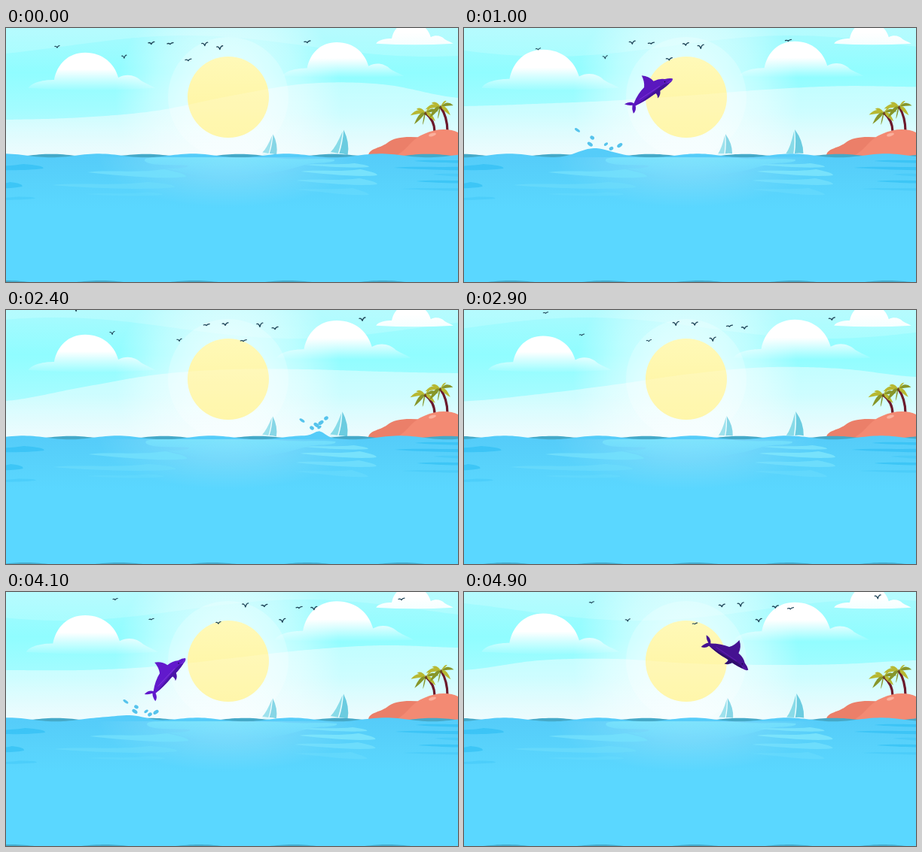
Write an HTML page with a canvas that moves like this. It is 600x338 px and loops after 5000 ms.

```html
<!DOCTYPE html>
<html lang="en">
<head>
<meta charset="utf-8">
<title>Sea with dolphin</title>
<style>
html, body { margin: 0; width: 100%; height: 100%; overflow: hidden; background: #5ad7ff; }
canvas { display: block; width: 100vw; height: 100vh; }
</style>
</head>
<body>
<canvas id="stage" width="600" height="338"></canvas>
<script>
const g = document.getElementById('stage').getContext('2d');
const W = 600, H = 338, LOOP = 5, STEP = 0.1, LEAP = 3.3, TAU = Math.PI * 2;

const wave = (t, period, peak = 0) => Math.cos(TAU * (t - peak) / period);

function fade(x0, y0, x1, y1, ...stops) {
  const f = g.createLinearGradient(x0, y0, x1, y1);
  stops.forEach(([at, color]) => f.addColorStop(at, color));
  return f;
}

function halo(x, y, r0, r1, ...stops) {
  const f = g.createRadialGradient(x, y, r0, x, y, r1);
  stops.forEach(([at, alpha]) => f.addColorStop(at, `rgba(255,255,255,${alpha})`));
  return f;
}

function shape(d, fill) {
  g.fillStyle = fill;
  g.fill(new Path2D(d));
}

function at(x, y, angle, scale, draw) {
  g.save();
  g.translate(x, y);
  g.rotate(angle);
  g.scale(scale, scale);
  draw();
  g.restore();
}

// fills from a height function to a flat edge
function area(top, edge, fill) {
  g.beginPath();
  g.moveTo(0, edge);
  for (let x = 0; x <= W; x += 4) g.lineTo(x, top(x));
  g.lineTo(W, edge);
  g.closePath();
  g.fillStyle = fill;
  g.fill();
}

function oval(x, y, rx, ry, fill) {
  g.beginPath();
  g.ellipse(x, y, rx, ry, 0, 0, TAU);
  g.fillStyle = fill;
  g.fill();
}

/* ---------- sky ---------- */

// time in the leap cycle, then heights every 100 px
const haze = [
  [0, 122, 119, 110, 90, 74, 75, 93],
  [0.5, 107, 108, 102, 91, 78, 71, 82],
  [0.8, 104, 104, 99, 88, 77, 71, 74],
  [1.6, 104, 91, 89, 95, 97, 96, 91],
  [2.4, 121, 103, 86, 79, 79, 82, 84],
  [3.3, 122, 119, 110, 90, 74, 75, 93]
];

function hazeLine(u) {
  const i = haze.findIndex(k => k[0] > u), a = haze[i - 1], b = haze[i];
  const k = (u - a[0]) / (b[0] - a[0]);
  const ys = a.slice(1).map((y, n) => y + (b[n + 1] - y) * k);
  return x => {
    const n = Math.min(5, Math.floor(x / 100)), s = x / 100 - n;
    const p = ys[Math.max(0, n - 1)], q = ys[n], r = ys[n + 1], v = ys[Math.min(6, n + 2)];
    return q + s * ((r - p) / 2 + s * (p - 2.5 * q + 2 * r - v / 2 + s * (1.5 * (q - r) + (v - p) / 2)));
  };
}

function sky(u) {
  g.fillStyle = fade(0, 0, 0, 170, [0, '#a8fafe'], [0.35, '#90fdff'], [0.65, '#a4fcff'], [1, '#cdf6fb']);
  g.fillRect(0, 0, W, 174);
  area(x => 24 + 14 * Math.cos(TAU * ((x - 560) / 640 - u / LEAP)), 0, 'rgba(255,255,255,.16)');

  oval(295, 92, 150, 150, halo(295, 92, 50, 150, [0, 0.6], [0.5, 0.35], [1, 0]));
  oval(295, 92, 80, 80, 'rgba(255,255,255,.22)');

  const line = hazeLine(u);
  area(line, 174, fade(0, 72, 0, 168, [0, 'rgba(255,255,255,.42)'], [0.45, 'rgba(255,255,255,.45)'], [1, 'rgba(255,255,255,.64)']));
  oval(295, 92, 54, 54, fade(0, 38, 0, 146, [0, '#fff9b8'], [1, '#fff49c']));
  g.save();
  g.beginPath();
  g.arc(295, 92, 54, 0, TAU);
  g.clip();
  area(line, 174, 'rgba(255,255,255,.14)');
  g.restore();
}

// grows and shrinks from the middle of its base
function cloud(x, base, scale, foot) {
  at(x, base, 0, scale, () => shape(
    'M-75 -2C-71 -10 -54 -13 -41 -13C-37 -34 -22 -49 0 -49C24 -49 39 -34 44 -16C55 -22 67 -19 74 -12C82 -7 87 -6 93 -2Q10 3 -75 -2Z',
    fade(0, -49, 0, 0, [0, '#fff'], [0.45, '#fff'], [1, foot])));
}

function clouds(t) {
  cloud(105, 82, 1.03 + 0.06 * wave(t, 3.7, 1.2), 'rgba(255,255,255,.05)');
  cloud(439, 66, 1.03 - 0.07 * wave(t, 7.4), 'rgba(255,255,255,0)');
  cloud(537, 22, 0.61, 'rgba(255,255,255,.88)');
}

const birds = [[68, 25], [157, 39], [193, 20], [218, 20], [264, 22], [284, 27], [242, 42], [400, 18], [20, -12]];

function flock(t) {
  g.strokeStyle = '#1d4256';
  g.lineWidth = 1.3;
  g.lineJoin = 'round';
  birds.forEach(([x0, y0], i) => {
    const climb = [2.6, 0.5, -0.4, -0.5, -0.5, -1.2, -0.8, -2.2, 5.2][i];
    const x = x0 + 30.5 * t, y = y0 + climb * t;
    const up = 1.8 + 1.6 * Math.sin(TAU * t / 1.1 + i * 1.7), s = i < 2 || i > 7 ? 0.8 : 1;
    at(x, y, -0.1, s, () => {
      g.beginPath();
      g.moveTo(-4, -up + 0.8);
      g.quadraticCurveTo(-1.5, -up, -0.3, 1.6);
      g.quadraticCurveTo(1.3, -up, 4, -up + 0.2);
      g.stroke();
    });
  });
}

/* ---------- horizon ---------- */

function boat(x, scale, t, lag, alpha) {
  const rock = wave(t, 2.1, lag);
  g.globalAlpha = alpha;
  at(x + 1.6 * rock, 168, 0.08 + 0.09 * rock, scale, () => {
    shape('M-12 -1Q-6 -9 -1 -31Q0 -14 -2 -1Z', '#88dbe8');
    shape('M0 -33Q11 -18 11 -1Q5 -2 -.5 -1Q2 -16 0 -33Z', '#6bcce0');
    shape('M-13 0H12L9 3H-9Z', '#d8f5fa');
  });
  g.globalAlpha = 1;
}

function palm(x, y, lean, tall, t) {
  const cx = x + lean + 0.6 * wave(t, 3.3, 1), cy = y - tall;
  g.strokeStyle = '#6b1a2c';
  g.lineCap = 'round';
  g.lineWidth = 3.2;
  g.beginPath();
  g.moveTo(x, y);
  g.quadraticCurveTo(x, y - tall * 0.6, cx, cy);
  g.stroke();
  at(cx, cy, 0.02 * wave(t, 3.3, 1), 1, () => {
    const leaves = [[-20, 3], [-15, 15], [-12, -5], [-4, 16], [8, -8], [17, -2], [13, 11]];
    leaves.forEach(([dx, dy], i) => {
      const bend = -Math.abs(dx) * 0.25 - 2;
      shape(`M0 0Q${dx * 0.5} ${dy * 0.3 + bend - 3} ${dx} ${dy}Q${dx * 0.45} ${dy * 0.6 + bend + 6} 0 0Z`,
        i % 2 ? '#87962a' : '#b7b832');
    });
    oval(0, 1, 1.8, 1.8, '#6b4a20');
  });
}

function island(t) {
  shape('M481 172C480 160 495 161 506 153C516 144 536 144 554 146L570 172Z', '#eb7f69');
  palm(569, 138, -12, 25, t);
  palm(586, 138, -9, 33, t);
  shape('M512 172C532 166 536 148 555 141C572 133 590 134 600 139V172Z', '#f38a73');
  at(566, 142, -0.3, 1, () => oval(0, 0, 5, 2, '#fbb09d'));
}

/* ---------- dolphin ---------- */

function dolphin(u) {
  if (u < 0.58 || u > 2.15) return;
  const d = u - 1.32, x = 347 + 166 * (u - 1.6), y = 71.5 + 161 * d * d;
  const light = 45 - 13 * Math.min(1, Math.max(0, (u - 0.8) / 0.8));
  g.save();
  g.beginPath();
  g.rect(0, 0, W, 169);
  g.clip();
  at(x, y, Math.atan2(322 * d, 166) + (d > 0 ? 0.1 : -0.03), 1, () => {
    const skin = `hsl(264 78% ${light}%)`, dark = `hsl(262 78% ${light - 8}%)`;
    shape('M-28 -1Q-33 -3 -36 -8Q-28 -8 -25 -2Q-13 -10 -2 -12Q3 -18 4 -27Q12 -21 13 -12Q22 -11 27 -6Q33 -4 36 -1Q35 2 29 2Q18 4 4 3Q-12 4 -25 2Q-27 8 -33 9Q-32 3 -28 -1Z', skin);
    shape('M29 2Q18 4 4 3Q-10 4 -22 2Q0 0 18 -1Q26 -1 29 2Z', dark);
    shape('M14 1Q12 9 5 10Q8 6 6 1Z', dark);
    g.strokeStyle = `hsl(268 70% ${light + 12}%)`;
    g.lineWidth = 0.7;
    g.stroke(new Path2D('M-16 -2Q2 -2 16 -2M27 0L34 0'));
    oval(25, -3, 0.8, 0.8, '#160638');
  });
  g.restore();
}

// offset and height of each drop
const splashes = [
  { x: 180, start: 0.6, now: 0.22, hump: [-10, 28, 6.5], drops: [[-21, 23], [-7, 16], [-9, 10], [6, 10], [19, 9], [11, 6]] },
  { x: 415, start: 1.95, now: 0.5, hump: [1, 10, 7], drops: [[-22, 22], [-9, 12], [-3, 16], [1, 13], [3, 19], [10, 25]] }
];
const SPLASH = 0.9;
const life = (s, u) => (u - s.start) / SPLASH;

function swell(u) {
  return x => splashes.reduce((sum, s) => {
    const k = life(s, u), [dx, width, tall] = s.hump;
    if (k <= 0 || k >= 1) return sum;
    const size = Math.sin(Math.PI * k) / Math.sin(Math.PI * s.now);
    return sum + tall * Math.min(1.2, size) * Math.exp(-(((x - s.x - dx) / width) ** 2));
  }, 0);
}

function drops(u) {
  splashes.forEach(s => {
    const k = life(s, u);
    if (k <= 0 || k >= 1) return;
    const rise = k * (1 - k) / (s.now * (1 - s.now));
    s.drops.forEach(([dx, h], i) => {
      const spread = 0.6 + 0.4 * k / s.now;
      at(s.x + dx * spread, 169 - h * rise, dx < 0 ? 0.6 : -0.6, 1, () =>
        oval(0, 0, i % 2 ? 3 : 4, i % 3 ? 2.3 : 1.7, '#55c3ec'));
    });
  });
}

/* ---------- sea ---------- */

// a streak pointed at both ends
function streak(x0, x1, y, thick, slope, fill) {
  const w = x1 - x0;
  shape(`M${x0} ${y}C${x0 + w * 0.2} ${y - thick} ${x0 + w * 0.5} ${y + thick * 0.4} ${x0 + w * 0.78} ${y - thick}` +
    `Q${x1 + 2} ${y - thick + slope} ${x1} ${y + slope}C${x0 + w * 0.75} ${y + thick + slope} ${x0 + w * 0.3} ${y + thick} ${x0} ${y}Z`, fill);
}

function sea(t, u) {
  const roll = x => Math.cos(TAU * (x - 60 - 62.5 * t) / 125);
  const bump = swell(u);
  area(x => 169.8 - 2.1 * roll(x), H, '#45a9c8');
  dolphin(u);
  area(x => 169.8 + 2.5 * roll(x) - bump(x), H, fade(0, 168, 0, 240, [0, '#55ccf9'], [0.5, '#58d2fb'], [1, '#5ad7ff']));

  // sunlight on the water
  g.save();
  g.beginPath();
  g.rect(0, 172, W, 80);
  g.clip();
  g.translate(295, 172);
  g.scale(1, 0.38);
  oval(0, 0, 175, 175, halo(0, 0, 0, 175, [0, 0.3], [0.5, 0.15], [1, 0]));
  g.restore();

  const sway = 3 * wave(t, LEAP, 1.4);
  at(sway * 0.8, 0, 0, 1, () => {
    shape('M186 176C187 170 215 173 260 172L360 173C385 176 420 173 438 175C442 181 404 178 396 183Q300 212 215 187C235 187 243 186 244 183C225 182 188 184 186 176Z',
      fade(0, 170, 0, 200, [0, 'rgba(124,230,252,.8)'], [0.4, 'rgba(120,228,254,.55)'], [1, 'rgba(110,222,255,0)']));
    streak(110, 241, 192, 4, 6, 'rgba(116,226,252,.75)');
    streak(63, 226, 209, 4, 3, 'rgba(112,222,252,.55)');
    streak(108, 210, 221, 2.5, 1, 'rgba(112,222,252,.25)');
  });
  at(-sway * 0.6, 0, 0, 1, () => {
    streak(393, 480, 182, 2, 3, 'rgba(130,232,253,.7)');
    streak(390, 491, 191, 3, 5, 'rgba(130,232,253,.75)');
    streak(384, 491, 203, 3, 5, 'rgba(124,229,253,.6)');
    streak(382, 480, 215, 2, 7, 'rgba(116,224,253,.35)');
  });

  const deep = 'rgba(44,190,243,.6)', soft = 'rgba(54,192,243,.35)';
  at(sway * 0.6, 0, 0, 1, () => {
    streak(-70, 51, 185, 4, 2, deep);
    streak(-50, 23, 209, 4, 2, deep);
    streak(-60, 40, 227, 2.5, 0, soft);
    streak(543, 660, 177, 3, 1, deep);
    streak(516, 670, 186, 3, 2, deep);
    streak(546, 670, 204, 3, 1, deep);
    streak(526, 660, 214, 2, 2, soft);
    streak(568, 660, 195, 3, 2, soft);
  });
  area(x => 338 - 2 * Math.cos(TAU * (x - 62.5 * t) / 125), H + 4, '#45aacb');
  drops(u);
}

function draw(t) {
  const u = t % LEAP;
  g.clearRect(0, 0, W, H);
  sky(u);
  clouds(t);
  flock(t);
  boat(348.5, 0.82, t, 0.1, 0.8);
  boat(441, 1, t, 0, 1);
  island(t);
  sea(t, u);
}

const begin = performance.now();
function tick(now) {
  const t = Math.max(0, now - begin) / 1000 % LOOP;
  draw(Math.floor(t / STEP + 1e-6) * STEP);
  requestAnimationFrame(tick);
}
draw(0);
requestAnimationFrame(tick);
</script>
</body>
</html>
```
